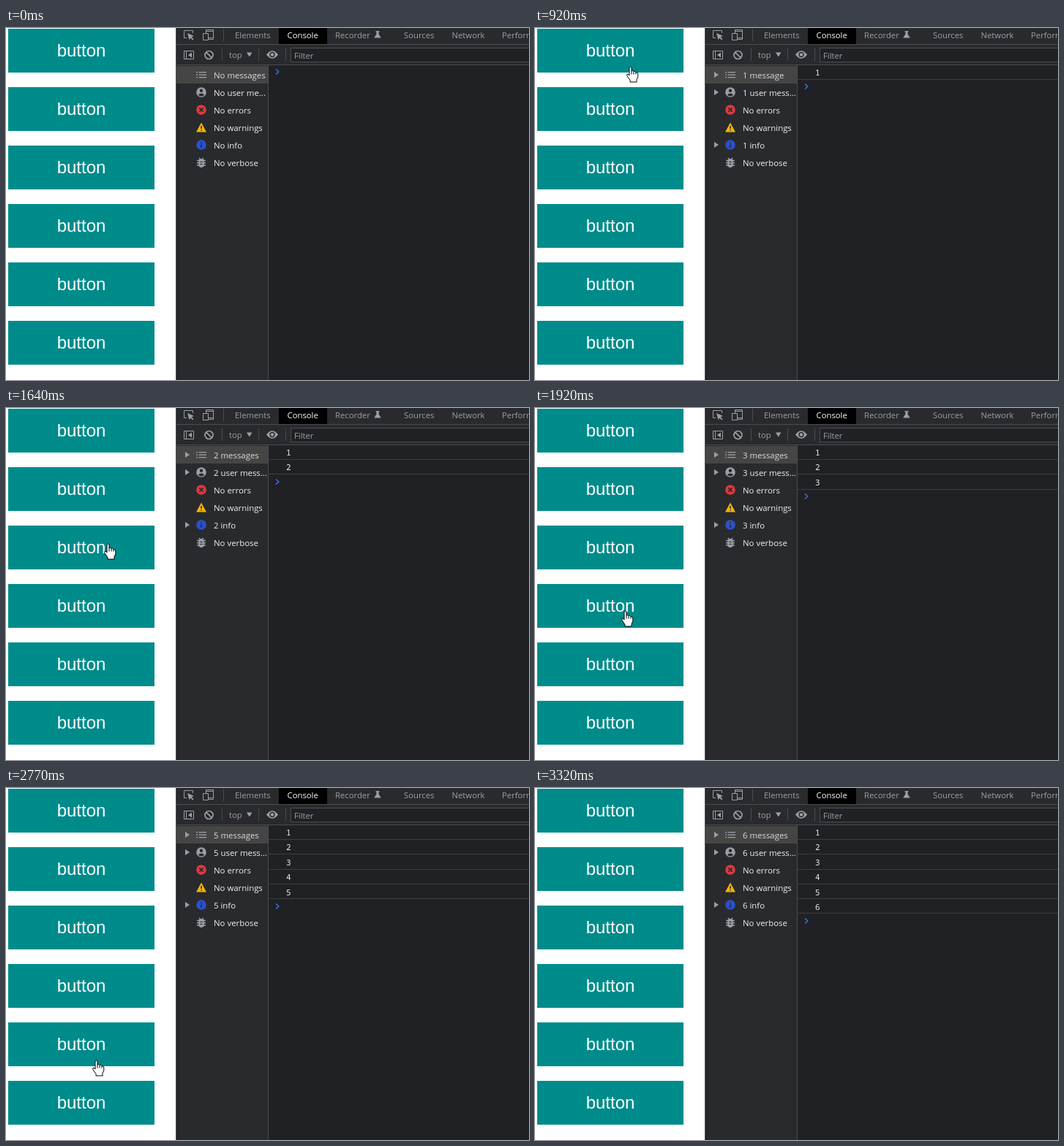
These frames come from a looping animation (715 by 482 pixels, 4.22 s). An HTML page with a canvas:

```html
<!DOCTYPE html>
<html lang="en">
<head>
<meta charset="utf-8">
<title>Button clicks logged to the console</title>
<style>
html, body { margin: 0; width: 100%; height: 100%; overflow: hidden; background: #fff; }
canvas { display: block; }
</style>
</head>
<body>
<canvas id="stage" width="715" height="482"></canvas>
<script>
const ctx = document.getElementById('stage').getContext('2d');
const LOOP = 4220;
const UI = '"Open Sans", "Noto Sans", sans-serif';
const GRAY = '#9aa0a6', LINE = '#494c50', PANEL = '#292a2d', DARK = '#202124';

// pointer tip: time, x, y
const path = [
  [60, 656, 466], [370, 125, 13], [790, 125, 13], [1120, 139, 125], [1270, 139, 125],
  [1340, 142, 161], [1500, 139, 185], [1770, 139, 185], [1920, 123, 277], [2080, 123, 280],
  [2320, 123, 280], [2390, 123, 321], [2560, 123, 360], [2740, 123, 360], [2770, 123, 372],
  [2920, 124, 420], [3050, 124, 420], [3290, 509, 476], [3320, 509, 476]
];
const clicks = [600, 1220, 1740, 2230, 2690, 2950];
const LOG_DELAY = 40, RING_TIME = 75;

const arrow = new Path2D('M0 0V16L3.6 12.6 6.2 19 8.7 18 6 11.8H11.2Z');
const hand = new Path2D('M-1.5 1.5Q0-.5 1.5 1.5V6.5Q3-.0 4.5 7Q6 6 7.4 8Q10 7.5 10.3 10.5V14.5L8.5 18V21.5H-.5V19L-4.7 13Q-5.3 10.3-3.4 10.5L-1.5 12.5Z'.replace('Q3-.0 4.5 7', 'Q3.2 5.2 4.5 7'));
const knuckles = new Path2D('M1.5 6.5V11M4.5 7.5V11M7.4 8.5V11');

function rect(x, y, w, h, color) {
  ctx.fillStyle = color;
  ctx.fillRect(x, y, w, h);
}

function text(s, x, y, color, font = '11.3px ' + UI) {
  ctx.font = font;
  ctx.fillStyle = color;
  ctx.fillText(s, x, y);
}

function disc(x, y, r, color) {
  ctx.fillStyle = color;
  ctx.beginPath();
  ctx.arc(x, y, r, 0, 7);
  ctx.fill();
}

function fill(d, color) {
  ctx.fillStyle = color;
  ctx.fill(new Path2D(d));
}

function stroke(d, color, width = 1) {
  ctx.strokeStyle = color;
  ctx.lineWidth = width;
  ctx.stroke(new Path2D(d));
}

function drawButtons() {
  rect(0, 0, 232, 482, '#fff');
  ctx.textAlign = 'center';
  for (let i = 0; i < 6; i++) {
    rect(3, 1 + 80 * i, 200, 60, '#008b8b');
    text('button', 103, 39 + 80 * i, '#fff', '24px "Liberation Sans", Arial, sans-serif');
  }
  ctx.textAlign = 'left';
}

function drawTabs() {
  rect(232, 0, 483, 50, PANEL);
  rect(373, 0, 66, 22, '#000');
  rect(232, 22, 483, 1, LINE);
  rect(297, 1, 1, 17, LINE);
  [['Elements', 313], ['Console', 384.5], ['Recorder', 450], ['Sources', 544],
   ['Network', 609.5], ['Performance', 678]].forEach(([s, x]) =>
    text(s, x, 14, s === 'Console' ? '#fff' : GRAY));
  // inspect, device and flask icons
  stroke('M247 13.5H243.5V3.5H255.5V7', GRAY);
  fill('M248 7L257 11 253.5 12.2 256.5 15.3 255.2 16.5 252.2 13.4 250.7 16.5Z', GRAY);
  stroke('M273.5 7V2.5H283.5V15.5H277M269.5 7.5H276.5V16.5H269.5ZM274 4.5H283M277 13.5H283', GRAY);
  fill('M505.5 4H510.5V5.2H509.6V8.5L512.8 13.5H503.2L506.4 8.5V5.2H505.5Z', GRAY);
}

function drawToolbar() {
  rect(232, 50, 483, 1, LINE);
  stroke('M243.5 31.5H256.5V42.5H243.5ZM246.5 31.5V42.5', GRAY);
  fill('M254 33.5V40.5L249 37Z', GRAY);
  stroke('M283 37A5.5 5.5 0 1 1 272 37A5.5 5.5 0 1 1 283 37M273.6 33.2L281.4 40.8', GRAY, 1.7);
  [295, 345, 382].forEach(x => rect(x, 28, 1, 17, LINE));
  text('top', 305, 41, GRAY);
  fill('M329 33.5H336.5L332.75 39.5Z', GRAY);
  fill('M356 36.5Q364 26 372 36.5Q364 47 356 36.5Z', GRAY);
  disc(364, 36.5, 3.7, PANEL);
  disc(364, 36.5, 2.2, GRAY);
  rect(389, 27, 326, 20, LINE);
  rect(390, 28, 325, 18, DARK);
  text('Filter', 394, 42, GRAY);
}

function drawSidebar(n) {
  rect(233, 51, 125, 431, PANEL);
  rect(233, 51, 5, 431, '#252629');
  rect(233, 52, 125, 24, '#454545');
  rect(358, 51, 1, 431, LINE);

  const labels = [
    n ? n + (n > 1 ? ' messages' : ' message') : 'No messages',
    n ? n + ' user mess...' : 'No user me...',
    'No errors', 'No warnings', (n || 'No') + ' info', 'No verbose'
  ];
  labels.forEach((s, i) => {
    const y = 64 + 24 * i;
    text(s, 284, y + 5, i ? '#f1f1f1' : '#dcdcdc', '11.4px ' + UI);
    if (n && (i < 2 || i === 4)) fill(`M245 ${y - 4}V${y + 4}L251 ${y}Z`, GRAY);
  });

  for (const y of [60, 63.5, 67]) {
    rect(260, y, 2, 1.3, GRAY);
    rect(263.5, y, 10.5, 1.3, GRAY);
  }
  disc(267, 88, 6.8, GRAY);
  disc(267, 85.8, 2.2, PANEL);
  fill('M262.7 91.6Q267 87.2 271.3 91.6Q267 95.4 262.7 91.6Z', PANEL);
  disc(267, 112, 6.8, '#e0393e');
  stroke('M264.4 109.4L269.6 114.6M269.6 109.4L264.4 114.6', PANEL, 1.7);
  fill('M267 129.5L274 142.5H260Z', '#f4b400');
  rect(266.3, 134, 1.5, 4, PANEL);
  rect(266.3, 139.3, 1.5, 1.5, PANEL);
  disc(267, 160, 6.8, '#2b50cc');
  rect(266.2, 156.4, 1.6, 1.6, PANEL);
  rect(266.2, 159.3, 1.6, 4.4, PANEL);
  stroke('M261 181.5H273M261 184.8H273M261 188H273M264 178L266 180.5M270 178L268 180.5', GRAY, 1.4);
  fill('M263.3 183Q263.3 179 267 179Q270.7 179 270.7 183V187Q270.7 191 267 191Q263.3 191 263.3 187Z', GRAY);
  rect(265.4, 182.8, 3.2, 1.2, PANEL);
  rect(265.4, 185.9, 3.2, 1.2, PANEL);
}

function drawConsole(n, caret) {
  rect(359, 51, 356, 431, DARK);
  for (let i = 0; i < n; i++) {
    text(i + 1, 383, Math.round(65 + 20.4 * i), '#f1f1f1', '11px "Noto Sans Mono", monospace');
    rect(359, Math.floor(70.65 + 20.25 * i), 356, 1, '#3d3e40');
  }
  const y = Math.round(60 + 20.35 * n);
  stroke(`M369 ${y - 3.5}L372.7 ${y}L369 ${y + 3.5}`, '#3a6fe0', 1.6);
  if (caret) rect(383, 53, 1, 14, '#fff');
}

function pointerAt(t) {
  const i = path.findIndex(p => p[0] > t);
  if (i < 1) return null;
  const [t0, x0, y0] = path[i - 1], [t1, x1, y1] = path[i];
  const u = (t - t0) / (t1 - t0), e = u * u * (3 - 2 * u);
  return [x0 + (x1 - x0) * e, y0 + (y1 - y0) * e];
}

function drawPointer(t) {
  const tip = pointerAt(t);
  if (!tip) return;
  const [x, y] = tip.map(Math.round);
  const row = (y - 1) % 80;
  const overButton = x >= 3 && x < 203 && row > 0 && row < 60;
  const shape = overButton ? hand : arrow;

  ctx.save();
  ctx.translate(x + .5, y + .5);
  ctx.fillStyle = overButton ? '#fff' : '#000';
  ctx.fill(shape);
  if (clicks.some(c => t >= c && t < c + RING_TIME)) disc(0, .5, 15, 'rgba(255,255,0,.5)');
  ctx.strokeStyle = overButton ? '#000' : '#fff';
  ctx.lineWidth = 1;
  ctx.stroke(shape);
  if (overButton) ctx.stroke(knuckles);
  ctx.restore();
}

function draw(t) {
  const n = clicks.filter(c => t >= c + LOG_DELAY).length;
  drawButtons();
  drawTabs();
  drawToolbar();
  drawSidebar(n);
  drawConsole(n, t >= 120 && n === 0);
  rect(232, 0, 1, 482, LINE);
  drawPointer(t);
}

const start = performance.now();
function tick() {
  draw((performance.now() - start) % LOOP);
  requestAnimationFrame(tick);
}
tick();
</script>
</body>
</html>
```
